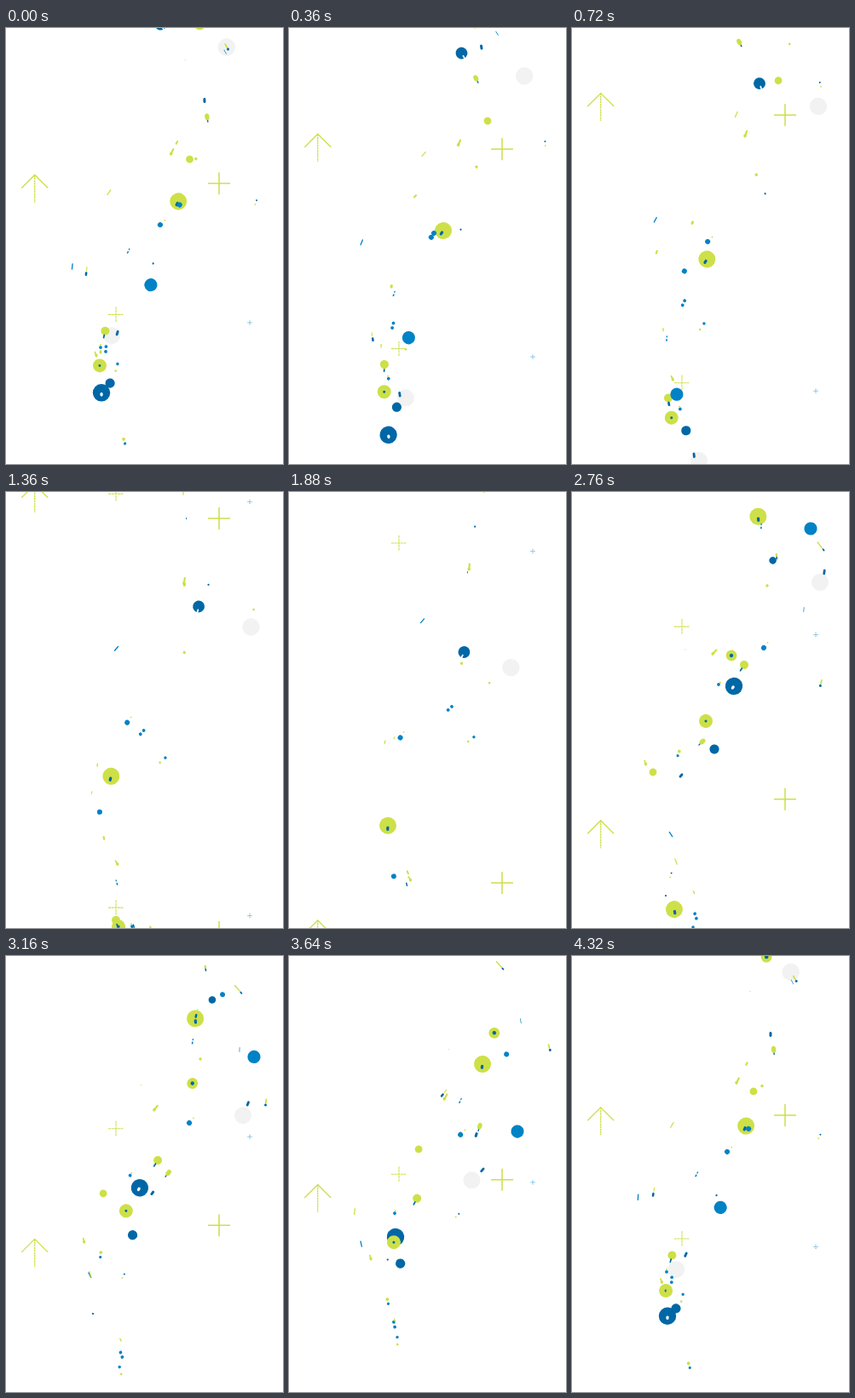
An HTML page for the animation above (4360 ms loop, 325 by 512 pixels).

```html
<!DOCTYPE html>
<html lang="en">
<head>
<meta charset="utf-8">
<title>Drifting particles</title>
<style>
  html, body { margin: 0; width: 100%; height: 100%; overflow: hidden; background: #fff; }
  svg { display: block; width: 325px; height: 512px; }
</style>
</head>
<body>
<svg id="stage" viewBox="0 0 325 512"></svg>
<script>
const LOOP = 4360, STEP = 40;
const LIME = '#cde047', NAVY = '#0067a6', BLUE = '#0082c6', GRAY = '#f2f2f2', WHITE = '#fff';
const stage = document.getElementById('stage');
const movers = [];

function make(tag, attrs, parent) {
  const el = document.createElementNS('http://www.w3.org/2000/svg', tag);
  for (const key in attrs) el.setAttribute(key, attrs[key]);
  if (parent) parent.appendChild(el);
  return el;
}

// Parts are drawn around the origin, with +x as the direction of travel.
const disc = (fill, r, at = 0) => ['circle', { cx: at, r, fill }];
const pill = (fill, length, width, at = 0) => ['rect', {
  x: at - length / 2, y: -width / 2, width: length, height: width, rx: width / 2, fill
}];
const oval = (fill, rx, ry, at = 0) => ['ellipse', { cx: at, rx, ry, fill }];

// Catmull-Rom curve through the points.
function curve(text) {
  const p = text.split(' ').map(pair => pair.split(',').map(Number));
  const at = i => p[Math.max(0, Math.min(p.length - 1, i))];
  let d = 'M' + p[0];
  for (let i = 0; i < p.length - 1; i++) {
    const [a, b, c, e] = [at(i - 1), at(i), at(i + 1), at(i + 2)];
    const c1 = b.map((v, k) => v + (c[k] - a[k]) / 6);
    const c2 = c.map((v, k) => v - (e[k] - b[k]) / 6);
    d += `C${c1} ${c2} ${c}`;
  }
  return d;
}

// A particle travels its curve at constant speed from start to end (ms).
function travel(start, end, points, ...parts) {
  const path = make('path', { d: curve(points) });
  const length = path.getTotalLength();
  for (let shift = 0; shift < end - start; shift += LOOP) {
    const g = make('g', {}, stage);
    parts.forEach(([tag, attrs]) => make(tag, attrs, g));
    movers.push(time => {
      const age = (((time - start) % LOOP) + LOOP) % LOOP + shift;
      const visible = age < end - start;
      g.setAttribute('display', visible ? 'inline' : 'none');
      if (!visible) return;
      const s = length * age / (end - start);
      const here = path.getPointAtLength(s);
      const a = path.getPointAtLength(Math.max(0, s - 1));
      const b = path.getPointAtLength(Math.min(length, s + 1));
      const angle = Math.atan2(b.y - a.y, b.x - a.x) * 180 / Math.PI;
      g.setAttribute('transform', `translate(${here.x} ${here.y}) rotate(${angle})`);
    });
  }
}

// Line signs scroll vertically; one tile height passes per loop.
function scroll(x, y, tile, direction, d, stroke, width, dash = 'none') {
  for (const copy of [0, 1]) {
    const el = make('path', { d, stroke, fill: 'none', 'stroke-width': width, 'stroke-dasharray': dash }, stage);
    movers.push(time => {
      const pos = (y + 40 + direction * tile * time / LOOP + tile * 2) % tile;
      el.setAttribute('transform', `translate(${x} ${pos - 40 + copy * tile})`);
    });
  }
}

scroll(33.7, 172.5, 581, -1, 'M-15.5 15.5L0 0L15.5 15.5', LIME, 1.3);
scroll(33.7, 172.5, 581, -1, 'M0 0V32.5', LIME, 1.3, '2.5 .6');
scroll(250, 182.5, 486, -1, 'M-13 0H13M0 -13V13', LIME, 1.5);
scroll(129, 336.5, 486, 1, 'M-9 0H9M0 -9V9', LIME, 1.1, '3 .6');
scroll(286, 346, 486, 1, 'M-2.5 0H3M0 -2.5V3', BLUE, 0.8, '1 1');

// Large discs
travel(3945, 7120, '232,-12 259,23 289,92 287,160 231,247 203,279', disc(GRAY, 10.2));
travel(2760, 5180, '291,106 279,185 218,259 130,363 127,370 149,508 153,528', disc(GRAY, 10));
travel(2760, 5080, '190,228 157,272 125,330 112,425 124,527', disc(NAVY, 10.2), oval(WHITE, 2.4, 1.7, 2));
travel(2280, 7400, '214,-25 222,73 227,127 203,202 158,272 123,335 115,446 126,521',
  disc(LIME, 10), pill(NAVY, 5.5, 3.2, 3.5));
travel(4300, 7120, '178,-10 220,65 226,135 182,235 157,272', disc(NAVY, 6.9), pill(WHITE, 5, 1.8, 5.5));
travel(2760, 5920, '157,269 141,299 123,336 110,395 117,459 132,510 136,527', disc(LIME, 8), disc(NAVY, 1.5));
travel(2760, 5720, '167,302 149,327 131,360 122,414 133,470 152,520', disc(NAVY, 5.6));
travel(2760, 5920, '202,203 178,240 150,285 117,353 113,435 129,503 135,524',
  disc(LIME, 5), pill(NAVY, 5, 1.7, 6.5));
travel(2760, 5620, '280,43 291,118 268,206 171,300 123,430 136,532', disc(BLUE, 7.6));
travel(2760, 4420, '187,192 219,149 241,88 228,0 225,-10', disc(LIME, 6.4), disc(NAVY, 2.2));
travel(2760, 5640, '95,329 114,279 152,227 214,157 242,63 229,-12', disc(LIME, 4.4));
travel(2280, 3400, '226,112 229,107 242,51 241,34', disc(NAVY, 4.3));

// Blue dots
travel(2760, 7120, '225,183 215,196 201,210 181,231 159,251 142,271 121,305 116,321',
  disc(BLUE, 3), disc(LIME, 0.9, -7.5));
travel(2760, 6720, '240,-12 254,45 255,116 205,206 131,287 110,378 140,520', disc(BLUE, 3));
travel(2760, 7120, '145,498 136,470 124,435 117,380 130,325 159,283 216,229 238,206',
  disc(BLUE, 1.9, 2.9), disc(BLUE, 1.9, -2.9));
travel(2760, 7120, '142,511 133,482 127,447 131,394 155,347 187,312 245,266 268,247',
  disc(BLUE, 1.7), disc(LIME, 1.3, -8.5));
travel(2760, 6620, '110,474 102,420 116,356 173,276 228,191 237,105 200,-8', disc(NAVY, 1.1));
travel(2760, 5780, '172,226 146,257 124,302 111,375 127,448 150,516', disc(BLUE, 1.9), disc(LIME, 1, -3));
travel(2760, 6220, '222,40 219,100 201,170 144,261 111,366 130,459 158,528',
  pill(BLUE, 3, 1.6, 2), pill(BLUE, 2.4, 1.3, -2));
travel(2280, 2760, '193,-4 197,7 208,52', disc(BLUE, 1.6, 2), disc(BLUE, 1.5, -2));
travel(5480, 7120, '214,2 211,43 206,156 190,198', pill(BLUE, 2.5, 1));

// Pills and strokes
travel(2760, 4920, '128,333 172,278 220,209 233,91 220,-12', pill(NAVY, 6, 3));
travel(2760, 5320, '153,293 191,254 224,199 236,105 196,16 178,-10',
  pill(NAVY, 5, 1.4, -4), oval(LIME, 4, 2.7));
travel(2760, 7120, '167,188 176,178 184,165 195,145 204,124 209,106 213,73 213,60',
  pill(LIME, 9, 2.2), disc(LIME, 1.8, -2.5));
travel(2760, 7120, '86,318 91,333 95,352 105,382 117,410 129,434 152,470 163,485',
  pill(LIME, 7, 1.8), disc(LIME, 1.7, 1.5));
travel(2760, 7120, '143,470 135,452 125,430 111,392 107,355 107,322 119,270 131,252', pill(LIME, 4.5, 1.4));
travel(2760, 5480, '216,-15 226,56 187,153 97,272 113,438 150,518',
  pill(NAVY, 5, 2.5, 1), pill(LIME, 5, 1.1, -5));
travel(2760, 5180, '296,94 284,173 228,250 131,357 143,500 150,518', pill(NAVY, 6.5, 2.8));
travel(2760, 7120, '116,402 98,374 84,335 78,278 99,223 131,182 182,120 198,93', pill(BLUE, 7.5, 1.3));
travel(2760, 5800, '122,434 99,374 77,300 117,199 193,101 208,2 207,-12', pill(LIME, 8, 1.3));
travel(2760, 4960, '272,138 274,112 273,83 262,38 235,-8', pill(BLUE, 6, 0.7));
travel(2760, 3900, '292,64 274,41 250,14 234,-4', pill(LIME, 10, 1.4, 2), pill(NAVY, 3.5, 1.8, -5));
travel(2760, 3320, '240,75 234,14 228,-10', pill(LIME, 4, 2.5, 1), pill(NAVY, 3.5, 1.6, -2.5));
travel(2760, 4640, '292,225 305,171 305,106 260,24 240,-10', pill(LIME, 6, 1.8, 2), disc(NAVY, 1.5, -2.5));
travel(5520, 7120, '156,528 150,510 127,417 112,380', pill(NAVY, 4.5, 1.4));
travel(6440, 7120, '118,528 111,495 103,450', pill(NAVY, 6, 3), disc(LIME, 1, 4));

// Lime dots
travel(3680, 6220, '262,-8 199,137 98,267 115,407 150,515', pill(LIME, 5, 2.2));
travel(3720, 6280, '140,515 111,384 140,232 209,110 230,-10', pill(LIME, 4.5, 3));
travel(2760, 7120, '229,110 228,121 223,153 216,173 209,189 196,213 190,222', disc(LIME, 1.7));
travel(2760, 5520, '116,450 138,375 200,302 292,208 292,69 246,-5',
  disc(NAVY, 1, 2.5), disc(LIME, 0.9, -2.5));
travel(2760, 4660, '125,307 111,351 116,406 139,486 150,518', disc(LIME, 1.9, -2.6), disc(BLUE, 1.6, 2.8));
travel(4940, 7120, '248,-8 255,18 290,140 172,299 128,362', disc(LIME, 1.3));
travel(5640, 7120, '173,516 167,506 111,383 98,333', pill(LIME, 5, 2));
travel(5480, 7120, '103,383 101,352 148,231 181,191', pill(LIME, 3.5, 1.2));
travel(6640, 7120, '168,518 162,510 140,470', pill(LIME, 3.5, 2));
travel(2760, 4820, '133,185 158,152 187,110 210,38 220,-10', disc(LIME, 0.6));

function draw(time) {
  movers.forEach(move => move(time));
}

const begin = performance.now();
function tick() {
  const elapsed = (performance.now() - begin) % LOOP;
  draw(Math.floor(elapsed / STEP) * STEP);
  requestAnimationFrame(tick);
}
draw(0);
requestAnimationFrame(tick);
</script>
</body>
</html>
```
